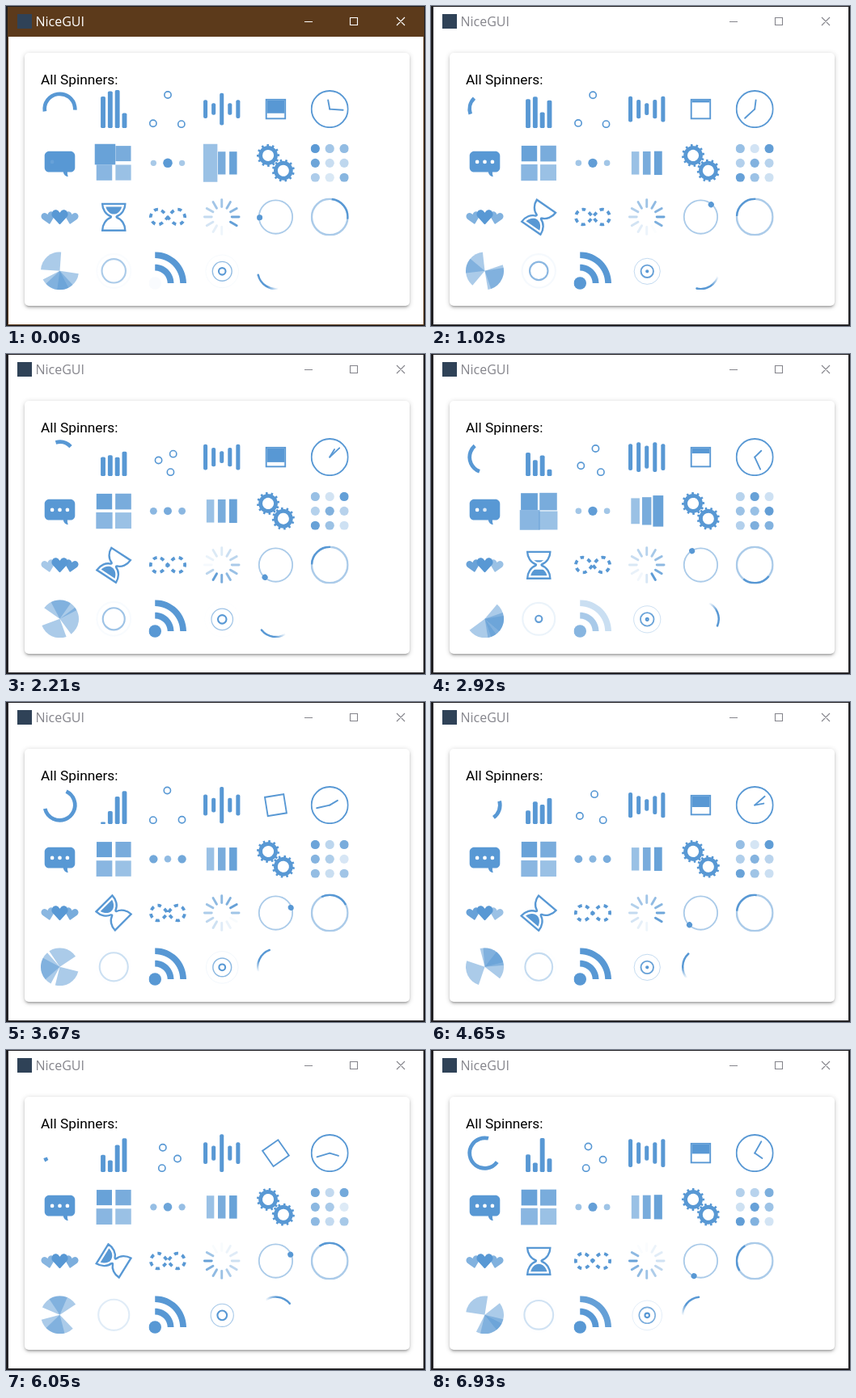
Write an HTML page with a canvas that moves like this. It is 518 px wide and 396 px high and loops after 6950 ms.

```html
<!DOCTYPE html>
<html lang="en">
<head>
<meta charset="utf-8">
<title>NiceGUI</title>
<style>
html, body { margin: 0; width: 518px; height: 396px; overflow: hidden; background: #1e1d20; }
.win { position: absolute; left: 2px; top: 1px; width: 515px; height: 394px; background: #2b2a2d; }
.bar { position: absolute; left: 1px; top: 0; width: 513px; height: 37px; background: #fff; color: #85858c; }
.body { position: absolute; left: 1px; top: 37px; width: 513px; height: 356px; background: #fff; }
.active { background: #5c3a1b; }
.active .bar { background: #5c3a1b; color: #fff; }
.icon { position: absolute; left: 11px; top: 9px; width: 18px; height: 18px; background: #2f4257; }
.title { position: absolute; left: 33.5px; top: 7px; font: 16px/22px "Open Sans", "Noto Sans", sans-serif; }
.bar svg { position: absolute; left: 360px; top: 8px; fill: none; stroke: currentColor; stroke-width: 1.1; }
.card {
  position: absolute; left: 23px; top: 58px; width: 476px; height: 313px; border-radius: 5px; background: #fff;
  box-shadow: 0 1.2px 6px rgba(0,0,0,.2), 0 2.5px 2.5px rgba(0,0,0,.14), 0 3.7px 1.2px -2.5px rgba(0,0,0,.12);
}
.label { position: absolute; left: 43px; top: 79px; font: 17.3px/24px Roboto, sans-serif; color: #000; white-space: nowrap; }
canvas { position: absolute; left: 0; top: 0; }
</style>
</head>
<body>
<div class="win" id="win">
  <div class="bar">
    <div class="icon"></div>
    <div class="title">NiceGUI</div>
    <svg width="140" height="20"><path d="M6 10.5H16M62.5 5.5h9v9h-9zM120 5l10 10M130 5l-10 10"/></svg>
  </div>
  <div class="body"></div>
</div>
<div class="card"></div>
<div class="label">All Spinners:</div>
<canvas id="stage" width="518" height="396"></canvas>
<script>
const ctx = document.getElementById('stage').getContext('2d');
const win = document.getElementById('win');
const LOOP = 6950, SIZE = 47, PITCH = 66.74, LEFT = 43, TOP = 104.1;
const COLOR = '#5898d4', TAU = Math.PI * 2;
let T = 0; // spinner clock in seconds

// --- timing helpers ---
const phase = (dur, begin = 0) => (((T - begin) % dur) + dur) % dur / dur;
const mix = (a, b, p) => a + (b - a) * p;

function keys(p, vals, times) {
  const n = vals.length - 1;
  const at = i => times ? times[i] : i / n;
  let i = 0;
  while (i < n - 1 && p >= at(i + 1)) i++;
  return mix(vals[i], vals[i + 1], (p - at(i)) / (at(i + 1) - at(i)));
}

function bezier(p, x1, y1, x2, y2) {
  const f = (s, a, b) => 3 * a * s * (1 - s) ** 2 + 3 * b * s * s * (1 - s) + s ** 3;
  let lo = 0, hi = 1;
  for (let i = 0; i < 24; i++) {
    const m = (lo + hi) / 2;
    if (f(m, x1, x2) < p) lo = m; else hi = m;
  }
  return f(lo, y1, y2);
}

// --- drawing helpers ---
function group(fn) { ctx.save(); fn(); ctx.restore(); }
function turn(a, x, y) { ctx.translate(x, y); ctx.rotate(a); ctx.translate(-x, -y); }
function dot(x, y, r, alpha = 1) {
  ctx.globalAlpha = alpha;
  ctx.beginPath(); ctx.arc(x, y, r, 0, TAU); ctx.fill();
}
function ring(x, y, r, width, alpha = 1, from = 0, to = TAU) {
  ctx.globalAlpha = alpha;
  ctx.lineWidth = width;
  ctx.beginPath(); ctx.arc(x, y, r, from, to); ctx.stroke();
}
function line(x1, y1, x2, y2, width) {
  ctx.lineWidth = width;
  ctx.lineCap = 'round';
  ctx.beginPath(); ctx.moveTo(x1, y1); ctx.lineTo(x2, y2); ctx.stroke();
}
function bar(x, y, w, h, r) {
  ctx.beginPath(); ctx.roundRect(x, y, w, h, Math.min(r, h / 2)); ctx.fill();
}

const shapes = {
  bubble: 'M78,19H22c-6.6,0-12,5.4-12,12v31c0,6.6,5.4,12,12,12h37.2c0.4,3,1.8,5.6,3.7,7.6c2.4,2.5,5.1,4.1,9.1,4c-1.4-2.1-2-7.2-2-10.3c0-0.4,0-0.8,0-1.3h8c6.6,0,12-5.4,12-12V31C90,24.4,84.6,19,78,19z',
  heart: 'M67.4 57.8l-23-25c-5.9-6.1-5.9-16.1 0-22.2 5.9-6.1 15.4-6.1 21.2 0L70 16.2l4.4-5.6c5.9-6.1 15.4-6.1 21.2 0 5.9 6.1 5.9 16.1 0 22.2l-23 25c-1.4 1.6-3.8 1.6-5.2 0z',
  sideHeart: 'M30.3 57L7.2 40.7c-5.8-4-7.6-12-3.8-18 3.7-6 11.4-7.7 17.3-3.7l4.5 3.8 2.6-5.3c3.7-6 11.5-7.7 17.3-3.7 5.8 4 7.6 12 3.8 18L34.5 56.1c-.9 1.5-2.8 1.9-4.2.9z',
  glass: 'M58.4,51.7c-0.9-0.9-1.4-2-1.4-2.3s0.5-0.4,1.4-1.4C70.8,43.8,79.8,30.5,80,15.5H20c0.2,15,9.2,28.1,21.6,32.3c0.9,0.9,1.4,1.2,1.4,1.5s-0.5,1.6-1.4,2.5C29.2,56.1,20.2,69.5,20,85.5h60C79.8,69.5,70.8,55.9,58.4,51.7z',
  sandTop: 'M29,23c3.1,11.4,11.3,19.5,21,19.5S67.9,34.4,71,23H29z',
  sandLow: 'M71.6,78c-3-11.6-11.5-20-21.5-20s-18.5,8.4-21.5,20H71.6z',
  eight: 'M24.3,30C11.4,30,5,43.3,5,50s6.4,20,19.3,20c19.3,0,32.1-40,51.4-40C88.6,30,95,43.3,95,50s-6.4,20-19.3,20C56.4,70,43.6,30,24.3,30z',
  wave: 'M90,150h30c0-49.7-40.3-90-90-90v30C63.1,90,90,116.9,90,150z',
  wideWave: 'M150,150h30C180,67.2,112.8,0,30,0v30C96.2,30,150,83.8,150,150z'
};
for (const k in shapes) shapes[k] = new Path2D(shapes[k]);

const gear = new Path2D();
for (let i = 0; i < 12; i++) {
  const a = i * TAU / 12, deg = TAU / 360;
  for (const [r, d] of [[25, -7], [30, -5], [30, 5], [25, 7], [25.3, 15]])
    gear.lineTo(r * Math.cos(a + d * deg), r * Math.sin(a + d * deg));
}
gear.closePath();
gear.moveTo(15, 0);
gear.arc(0, 0, 15, 0, TAU);

// --- spinners: [viewBox width, height, draw] ---
function plain() {
  const p = phase(1.5), first = p < .5;
  const e = bezier(first ? p * 2 : p * 2 - 1, .42, 0, .58, 1);
  const off = first ? 35 * e : mix(35, 124, e);
  const len = first ? mix(1, 89, e) : 89;
  turn(phase(2) * TAU, 25, 25);
  ring(25, 25, 20, 5, 1, off / 20, Math.min((off + len) / 20, TAU));
}

function audio() {
  const cols = [
    [4.3, 20, 45, 57, 80, 64, 32, 66, 45, 64, 23, 66, 13, 64, 56, 34, 34, 2, 23, 76, 79, 20],
    [2, 80, 55, 33, 5, 75, 23, 73, 33, 12, 14, 60, 80],
    [1.4, 50, 34, 78, 23, 56, 23, 34, 76, 80, 54, 21, 50],
    [2, 30, 45, 13, 80, 56, 72, 45, 76, 34, 23, 67, 30]
  ];
  cols.forEach(([dur, ...vals], i) => {
    const h = keys(phase(dur), vals);
    bar(i * 15, 80 - h, 10, h, 3);
  });
}

function ball() {
  const p = phase(2.2) * 3, xs = [5, 27, 49], ys = [50, 5, 50];
  for (let i = 0; i < 3; i++) {
    const a = (Math.floor(p) + i) % 3, b = (a + 1) % 3, f = p % 1;
    ring(1 + mix(xs[a], xs[b], f), 1 + mix(ys[a], ys[b], f), 5, 2);
  }
}

function bars() {
  const vals = [120, 110, 100, 90, 80, 70, 60, 50, 40, 140, 120];
  for (let i = 0; i < 5; i++) {
    const h = keys(phase(1, Math.abs(i - 2) * .25), vals);
    bar(i * 30, 70 - h / 2, 15, h, 6);
  }
}

function box() {
  const s = phase(1.8) * 1.8;
  ctx.lineWidth = 4;
  group(() => {
    if (s > 1.3) turn((s - 1.3) * TAU, 50, 50);
    ctx.strokeRect(25, 25, 50, 50);
  });
  if (s < 1.3) ctx.fillRect(27, 27, 46, 50 * (1 - s / 1.3));
}

function clock() {
  ring(50, 50, 48, 4);
  group(() => { turn(phase(2) * TAU, 50, 50); line(50, 50, 85, 50.5, 4); });
  group(() => { turn(phase(15) * TAU, 50, 50); line(50, 50, 49.5, 74, 4); });
}

function comment() {
  ctx.fill(shapes.bubble);
  ctx.fillStyle = '#fff';
  for (let i = 0; i < 3; i++)
    dot(30 + i * 20, 47, 5, Math.min(1, Math.max(0, phase(1) * 5 - i)));
}

function cube() {
  [[25, 25, .9, 0], [75, 25, .8, .1], [25, 75, .7, .3], [75, 75, .6, .2]].forEach(([x, y, alpha, begin]) => {
    const h = 20 * mix(1.5, 1, bezier(phase(1, begin), .2, .8, .2, .8));
    ctx.globalAlpha = alpha;
    ctx.fillRect(x - h, y - h, h * 2, h * 2);
  });
}

function dots() {
  const k = Math.abs(phase(.8) * 2 - 1);
  for (let i = 0; i < 3; i++) {
    const v = i === 1 ? 1 - k : k;
    dot(15 + i * 45, 15, mix(9, 15, v), mix(.5, 1, v));
  }
}

function columns() {
  [.6, .8, .9].forEach((alpha, i) => {
    const s = mix(2, 1, bezier(phase(1, i * .1), .1, .9, .4, 1));
    ctx.globalAlpha = alpha;
    ctx.fillRect(20 + i * 30 - 10 * s, 50 - 30 * s, 20 * s, 60 * s);
  });
}

function gears() {
  const a = phase(1) * TAU / 4;
  for (const [c, r] of [[30, -a], [70, a + TAU / 24]])
    group(() => { ctx.translate(c, c); ctx.rotate(r); ctx.fill(gear, 'evenodd'); });
}

function grid() {
  [0, .3, .8, .1, .6, .4, .7, .5, .2].forEach((begin, i) =>
    dot(12.5 + i % 3 * 40, 12.5 + Math.floor(i / 3) * 40, 12.5, keys(phase(1, begin), [1, .2, 1])));
}

function hearts() {
  const glow = begin => keys(phase(1.4, begin), [.5, 1, .5]);
  ctx.globalAlpha = glow(0);
  ctx.fill(shapes.sideHeart);
  group(() => {
    ctx.translate(140, 0);
    ctx.scale(-1, 1);
    ctx.globalAlpha = glow(.7);
    ctx.fill(shapes.sideHeart);
  });
  ctx.globalAlpha = 1;
  ctx.fill(shapes.heart);
}

function hourglass() {
  const p = phase(1), sand = Math.min(1, p * 2) * 25;
  const part = (shape, y, h) => group(() => {
    ctx.beginPath(); ctx.rect(15, y, 70, h); ctx.clip();
    ctx.fill(shape);
  });
  turn(Math.max(0, (p - .7) / .3) * Math.PI, 50, 50);
  ctx.lineWidth = 5;
  ctx.stroke(shapes.glass);
  part(shapes.sandTop, 20 + sand, 25 - sand);
  part(shapes.sandLow, 80 - sand, sand);
}

function infinity() {
  const d = 10.6912;
  ctx.lineWidth = 8;
  ctx.setLineDash([d, d]);
  ctx.lineDashOffset = phase(2) * d * 2;
  ctx.stroke(shapes.eight);
}

function ios() {
  const fade = [1, .85, .7, .65, .55, .45, .35, .25, .15, .1, 0];
  const p = phase(.75) * 11, j = Math.floor(p);
  ctx.translate(32, 32);
  for (let k = 0; k < 12; k++) {
    ctx.globalAlpha = mix(fade[(j - k + 22) % 11], fade[(j - k + 23) % 11], p - j);
    line(0, -17, 0, -29, 4);
    ctx.rotate(TAU / 12);
  }
}

function orbit() {
  const p = phase(2);
  ring(50, 50, 44, 4, .5);
  turn(p * TAU, 50, 48 + 4 * p);
  dot(8, 54, 7.5);
}

function oval() {
  const a = phase(1) * TAU;
  ring(19, 19, 18, 2, .5);
  ring(19, 19, 18, 2, 1, a - TAU / 4, a);
}

function pie() {
  ctx.globalAlpha = .5;
  for (let i = 0; i < 4; i++) {
    const a = phase(.8 * (i + 1)) * TAU + (i + 2) * TAU / 4;
    ctx.beginPath(); ctx.moveTo(50, 50); ctx.arc(50, 50, 50, a, a + TAU / 4); ctx.fill();
  }
}

function puff() {
  for (const begin of [0, -.9]) {
    const p = phase(1.8, begin);
    ring(22, 22, mix(1, 20, bezier(p, .165, .84, .44, 1)), 2, 1 - bezier(p, .3, .61, .355, 1));
  }
}

function radio() {
  const alpha = i => Math.min(1, phase(1, i * .1) * 2);
  ctx.scale(.55, .55);
  dot(30, 150, 30, alpha(0));
  ctx.globalAlpha = alpha(1);
  ctx.fill(shapes.wave);
  ctx.globalAlpha = alpha(2);
  ctx.fill(shapes.wideWave);
}

function rings() {
  for (const begin of [1.5, 3]) {
    const p = phase(3, begin);
    ring(23, 23, mix(6, 22, p), 2 * (1 - p), 1 - p);
  }
  ring(23, 23, keys(phase(1.5), [6, 1, 2, 3, 4, 5, 6]), 2);
}

function tail() {
  const g = ctx.createLinearGradient(19.45, 0, 29.82, 4.3);
  [[0, 0], [.631, .631], [1, 1]].forEach(([o, a]) => g.addColorStop(o, `rgba(88,152,212,${a})`));
  ctx.translate(1, 1);
  turn(phase(.9) * TAU, 18, 18);
  ctx.strokeStyle = g;
  ring(18, 18, 18, 2, 1, -TAU / 4, 0);
  dot(36, 18, 1);
}

const spinners = [
  [50, 50, plain], [55, 80, audio], [57, 57, ball], [135, 140, bars], [100, 100, box], [100, 100, clock],
  [100, 100, comment], [100, 100, cube], [120, 30, dots], [100, 100, columns], [100, 100, gears], [105, 105, grid],
  [140, 64, hearts], [100, 100, hourglass], [100, 100, infinity], [64, 64, ios], [100, 100, orbit], [38, 38, oval],
  [100, 100, pie], [44, 44, puff], [100, 100, radio], [45, 45, rings], [38, 38, tail]
];

const pace = [[0, 0], [20, 1], [700, 27], [1400, 62], [2110, 97], [2820, 132], [3530, 163], [4230, 197],
  [4930, 232], [5630, 267], [5710, 267], [6410, 302], [6930, 328], [LOOP, 328]];

function ticks(ms) {
  const i = pace.findIndex(k => ms < k[0]);
  const [t0, n0] = pace[i - 1], [t1, n1] = pace[i];
  return Math.floor(mix(n0, n1, (ms - t0) / (t1 - t0)) + 1e-6);
}

function draw(ms) {
  T = 22.018 + ticks(ms) * .0172;
  win.classList.toggle('active', ms < 20);
  ctx.clearRect(0, 0, 518, 396);
  spinners.forEach(([w, h, fn], i) => group(() => {
    const s = SIZE / Math.max(w, h);
    ctx.translate(LEFT + i % 6 * PITCH, TOP + Math.floor(i / 6) * PITCH);
    ctx.beginPath(); ctx.rect(0, 0, SIZE, SIZE); ctx.clip();
    ctx.translate((SIZE - w * s) / 2, (SIZE - h * s) / 2);
    ctx.scale(s, s);
    ctx.fillStyle = ctx.strokeStyle = COLOR;
    fn();
  }));
}

const start = performance.now();
function frame() {
  draw((performance.now() - start) % LOOP);
  requestAnimationFrame(frame);
}
draw(0);
requestAnimationFrame(frame);
</script>
</body>
</html>
```
